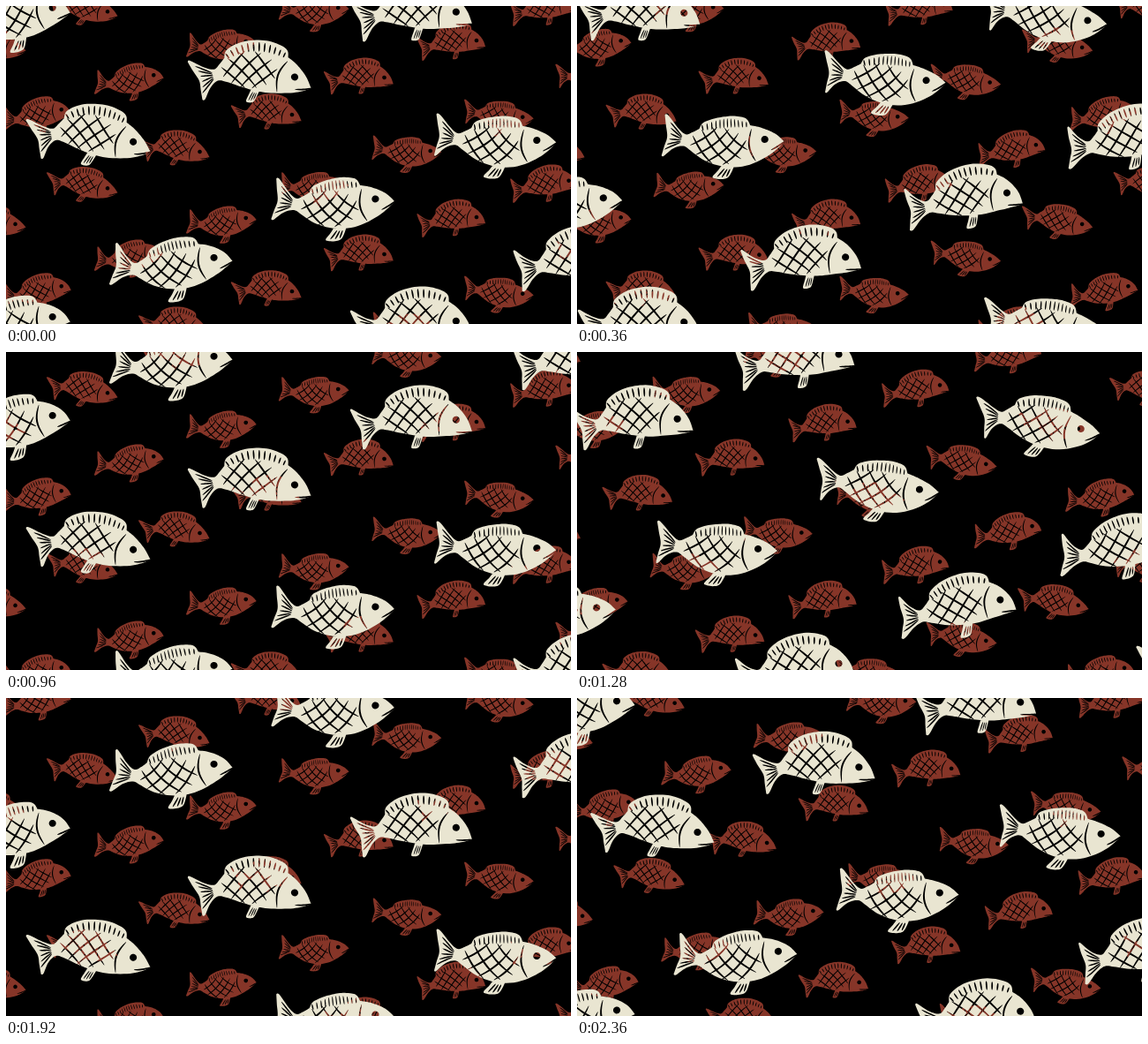
An HTML page with a canvas that plays this animation: 640x360 px, repeating every 2400 ms.

```html
<!DOCTYPE html>
<html lang="en">
<head>
<meta charset="utf-8">
<title>Swimming fish</title>
<style>
  html, body { margin: 0; width: 100%; height: 100%; overflow: hidden; background: #000; }
  canvas { position: absolute; left: 0; top: 0; }
</style>
</head>
<body>
<canvas id="far" width="640" height="360"></canvas>
<canvas id="near" width="640" height="360"></canvas>
<script>
const LOOP = 2400;
const COLUMN = 640 / 7, TILE_W = COLUMN * 5, TILE_H = 350;
const WAVE = 0.032, HEIGHT = 8.6;

// Catmull-Rom spline through [x, y, x, y, ...]
function curve(...c) {
  const n = c.length / 2, out = [];
  const at = (i, k) => c[2 * Math.max(0, Math.min(n - 1, i)) + k];
  for (let i = 0; i < n - 1; i++)
    for (let s = 0; s < 6; s++) {
      const u = s / 6;
      out.push([0, 1].map(k => {
        const a = at(i - 1, k), b = at(i, k), d = at(i + 1, k), e = at(i + 2, k);
        return b + u / 2 * (d - a + u * (2 * a - 5 * b + 4 * d - e + u * (3 * (b - d) + e - a)));
      }));
    }
  out.push([at(n - 1, 0), at(n - 1, 1)]);
  return out;
}

// Tapered cut from one point to another, bowed sideways by bend
function cut(x0, y0, x1, y1, width, bend = 0) {
  const dx = x1 - x0, dy = y1 - y0, len = Math.hypot(dx, dy);
  const left = [], right = [];
  for (let i = 0; i <= 10; i++) {
    const u = i / 10, arch = Math.sin(Math.PI * u);
    const half = width / 2 * (0.25 + 0.75 * Math.sqrt(Math.max(0, arch)));
    const put = d => [x0 + dx * u - dy / len * d, y0 + dy * u + dx / len * d];
    left.push(put(bend * arch + half));
    right.unshift(put(bend * arch - half));
  }
  return left.concat(right);
}

const bodies = [
  [
    ...curve(-64, -19, -61, -8, -57, 5, -58, 16, -59, 27),
    ...curve(-59, 27, -56, 27, -47, 16, -37, 10.5, -28, 13.5, -12, 20.5, 8, 25, 28, 25, 50, 19.5, 64, 13.5, 72.5, 8),
    ...curve(72.5, 8, 66, -2, 58, -9.5, 49, -15.5, 40, -19.5),
    ...curve(40, -19.5, 38, -26, 32, -30, 18, -32.5, 4, -31.5, -10, -28, -22, -21, -25, -13),
    ...curve(-25, -13, -31, -7.5, -38, -3, -48, -8, -61, -19.5, -64, -19)
  ],
  curve(5, 24, 2, 30, -2, 37, 0, 39, 7, 39, 12, 36, 17, 24)
];

const holes = [
  cut(40.5, -15, 38, 21.5, 2, 5),
  cut(73, 8, 56, 13.5, 1.8, -0.6),
  cut(8, 27, 2, 37, 1.4),
  cut(10.5, 27.5, 6, 37, 1.4),
  cut(13, 27.5, 10, 36, 1.4)
];
const eye = [];
for (let i = 0; i < 16; i++) {
  const a = i * Math.PI / 8;
  eye.push([52.5 + 4 * Math.cos(a), 4 * Math.sin(a)]);
}
holes.push(eye);
for (let i = 0; i < 6; i++)
  holes.push(cut(-57 + Math.sin(i * 0.63) * 3, -12 + 6.3 * i, -41, 0.5 + 1.4 * i, 1.6));
for (let i = 0; i <= 11; i++) {
  const u = i / 11, arch = Math.sin(Math.PI * u);
  const x = -20 + 55 * u, y = -12 - 6 * u - 4 * arch;
  holes.push(cut(x, y, x - 3 + 4 * u, y - 6 - 4.5 * arch, 1.5));
}
// Crossed scale lines, each a chord of an ellipse
for (const side of [-1, 1])
  for (let i = -1.5; i < 2; i++) {
    const rx = 32, ry = 21, c = i * 17, dx = side * 0.7, dy = 0.71;
    const a = (dx / rx) ** 2 + (dy / ry) ** 2, b = c * dx / rx ** 2;
    const root = Math.sqrt(b * b - a * ((c / rx) ** 2 - 1));
    const [p, q] = [(-b - root) / a, (-b + root) / a];
    holes.push(cut(1 + c + p * dx, 2 + p * dy, 1 + c + q * dx, 2 + q * dy, 2, side));
  }

// Bends a fish along the sine path it swims on
function trace(ctx, shape, fx, fy) {
  shape.forEach(([px, v], i) => {
    const x = fx + px, tilt = Math.atan(HEIGHT * WAVE * Math.cos(WAVE * x));
    const X = x - v * Math.sin(tilt);
    const Y = fy + HEIGHT * Math.sin(WAVE * x) + v * Math.cos(tilt);
    i ? ctx.lineTo(X, Y) : ctx.moveTo(X, Y);
  });
  ctx.closePath();
}

function school(id, scale, color) {
  const ctx = document.getElementById(id).getContext('2d');
  ctx.fillStyle = color;
  return progress => {
    ctx.setTransform(1, 0, 0, 1, 0, 0);
    ctx.clearRect(0, 0, 640, 360);
    ctx.setTransform(scale, 0, 0, scale, 320, 180);
    const spots = [], maxX = 320 / scale + 85, maxY = 180 / scale + 60;
    for (let i = -9; i < 12; i++) {
      const x = (i - 3.5) * COLUMN + progress * TILE_W;
      if (Math.abs(x) > maxX) continue;
      const first = (140 * i + 3500 - 171.5) % TILE_H - 2 * TILE_H;
      for (let y = first; y < maxY; y += TILE_H) if (y > -maxY) spots.push([x, y]);
    }
    const paint = (shapes, mode) => {
      ctx.globalCompositeOperation = mode;
      for (const [x, y] of spots) {
        ctx.beginPath();
        for (const shape of shapes) trace(ctx, shape, x, y);
        ctx.fill();
      }
    };
    paint(bodies, 'source-over');
    paint(holes, 'destination-out');
  };
}

const schools = [school('far', 4 / 7, '#863528'), school('near', 1, '#e9e5d1')];

function draw() {
  const progress = performance.now() % LOOP / LOOP;
  for (const swim of schools) swim(progress);
  requestAnimationFrame(draw);
}
draw();
</script>
</body>
</html>
```
